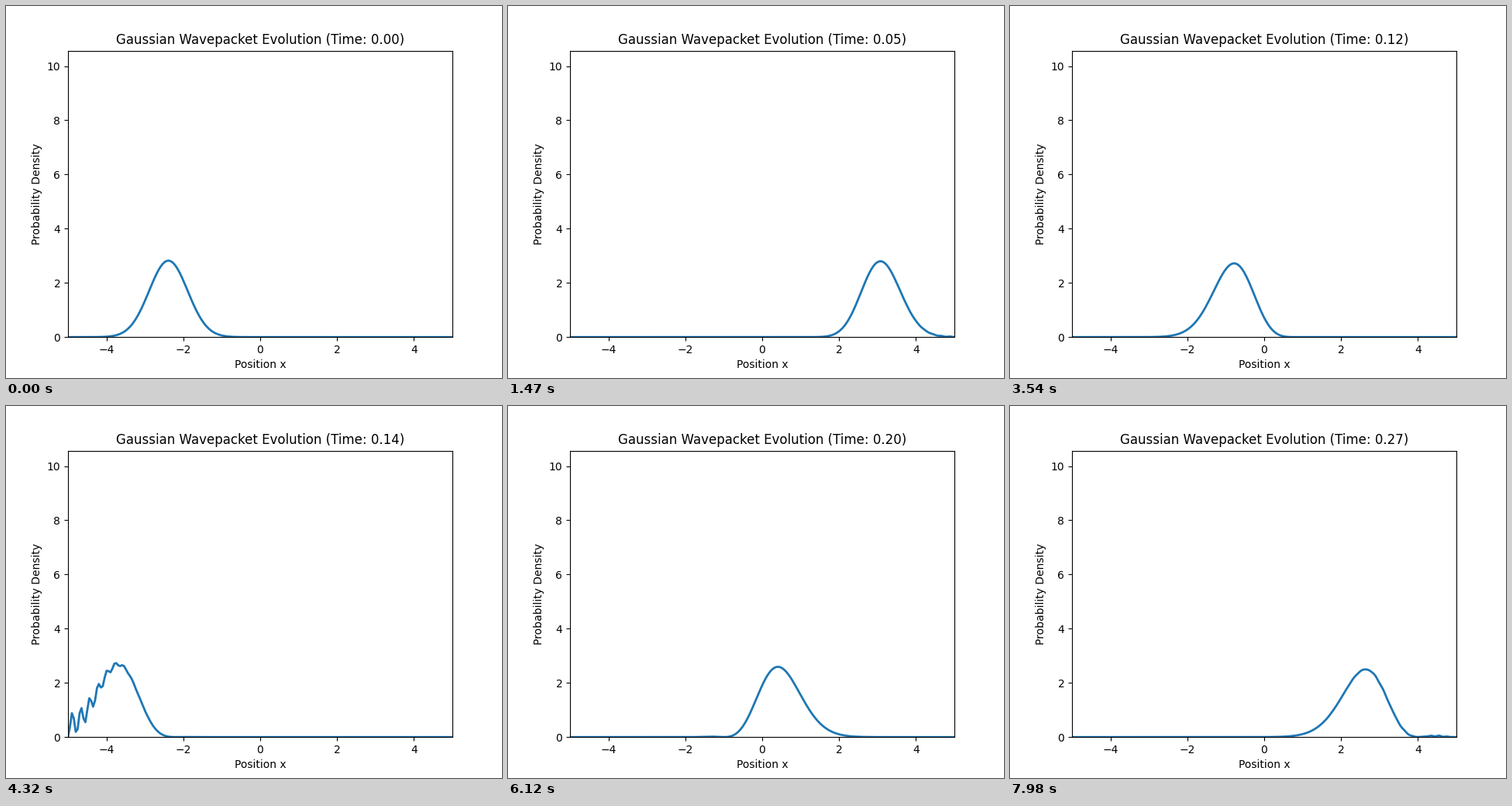
A matplotlib script that plays this animation: 640x480 px, repeating every 8000 ms.

```python
import numpy as np
import matplotlib.pyplot as plt
from matplotlib.animation import FuncAnimation

# Wave packet in a box with hard walls, stepped by the Crank-Nicolson rule.
FRAMES = 267
LOOP_MS = 8000
DT = 0.001
HALF = 5.0
POINTS = 200
INV_MASS = 11.23
K0 = 14.14
X0 = -2.5
SIGMA = 0.5
PEAK = 5 / np.sqrt(np.pi)

x = np.linspace(-HALF, HALF, POINTS)
dx = x[1] - x[0]
cells = POINTS - 1

# The sine modes of the box diagonalise the three-point Laplacian.
modes = np.pi * np.arange(1, cells) / cells
basis = np.sin(np.outer(np.arange(POINTS), modes))
q = INV_MASS * DT / (2 * dx**2) * (1 - np.cos(modes))
phase = -2 * np.arctan(q)

packet = np.sqrt(PEAK) * np.exp(-((x - X0) / (2 * SIGMA))**2 + 1j * K0 * x)
coeffs = basis.T @ packet * 2 / cells


def density(step):
    return np.abs(basis @ (coeffs * np.exp(1j * phase * step)))**2


fig, ax = plt.subplots(figsize=(6.4, 4.8), dpi=100)
ax.set_xlim(-HALF, HALF)
ax.set_ylim(0, 10.57)
ax.set_xlabel("Position x")
ax.set_ylabel("Probability Density")
line, = ax.plot(x, density(1), lw=2)
title = ax.set_title("")


def update(i):
    line.set_ydata(density(i + 1))
    title.set_text(f"Gaussian Wavepacket Evolution (Time: {i * DT:.2f})")
    return line, title


anim = FuncAnimation(fig, update, frames=FRAMES, interval=LOOP_MS / FRAMES,
                     repeat=True, repeat_delay=0, blit=False)
plt.show()
```
